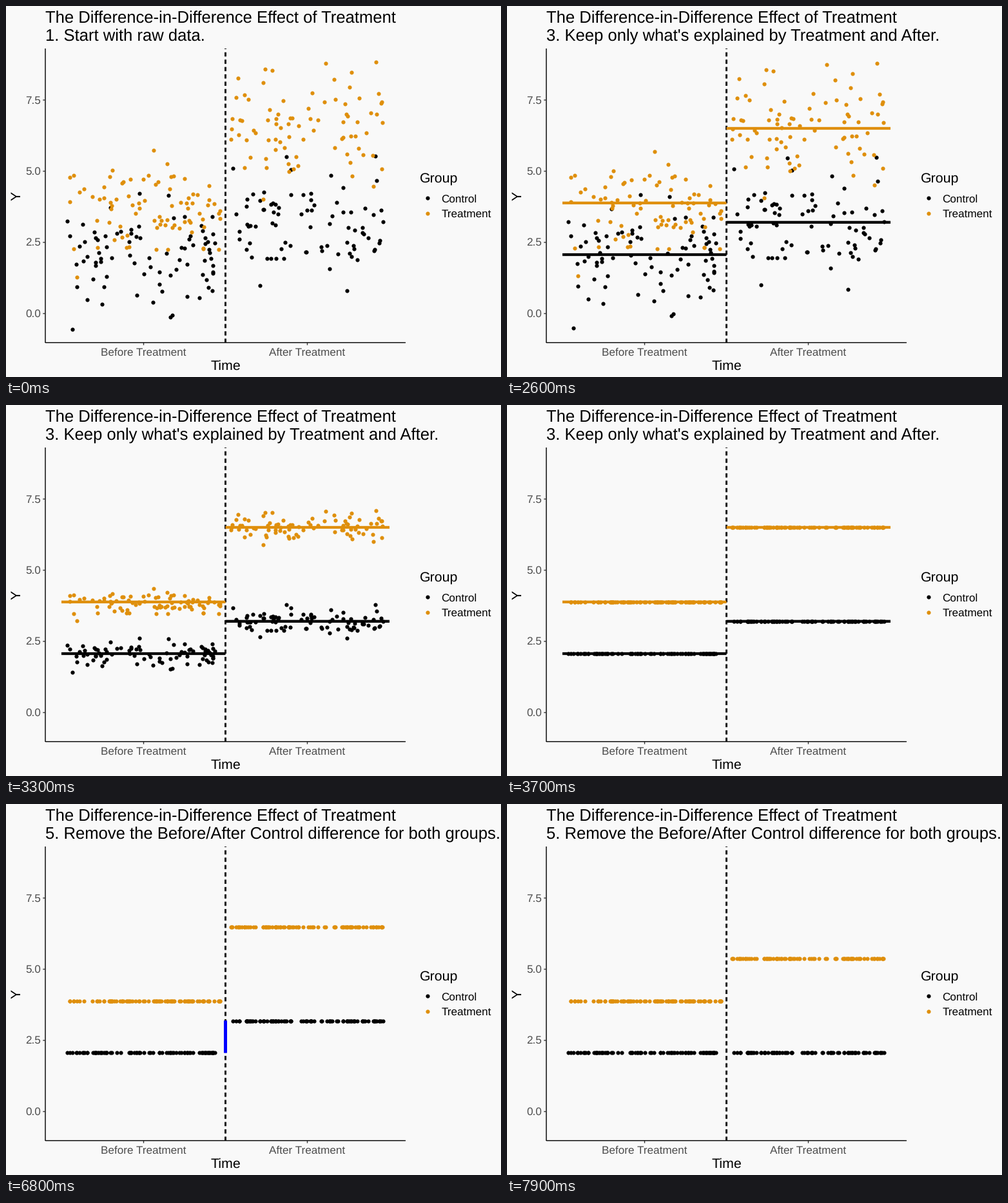
Write a matplotlib script that moves like this. It is 768 by 576 pixels and loops after 8000 ms.

```python
import numpy as np
import matplotlib.pyplot as plt
from matplotlib.animation import FuncAnimation

W, H, DPI = 768, 576, 96
PX = 72 / DPI  # points per pixel
STEP_MS, N_FRAMES = 100, 80
BLACK, ORANGE, BLUE, BG = "#000000", "#df8f0c", "#0000ff", "#f9f9f9"
LEFT, MID, RIGHT = 86, 340.5, 595  # edges of the two periods
TREND = 1.135  # change of Control over time

plt.rcParams.update({
    "font.family": "Liberation Sans",
    "text.hinting": "none",
    "lines.solid_capstyle": "butt",
})

# Step start, in frames, and its subtitle
STEPS = [
    (0, "1. Start with raw data."),
    (5, "2. Explain Y using Treatment and After."),
    (26, "3. Keep only what's explained by Treatment and After."),
    (47, "4. See how Control changed Before to After."),
    (68, "5. Remove the Before/After Control difference for both groups."),
]


def to_px(y):
    return 477.5 - 44.2 * y


def ease(t):
    return (1 - np.cos(np.pi * np.clip(t, 0, 1))) / 2


fig = plt.figure(figsize=(W / DPI, H / DPI), dpi=DPI, facecolor=BG)
ax = fig.add_axes([0, 0, 1, 1])
ax.set(xlim=(0, W), ylim=(H, 0))
ax.axis("off")


def label(x, y, s, size, color=BLACK, **kw):
    return ax.text(x, y, s, fontsize=size, color=color, va="baseline", **kw)


def line(x, y, width, color=BLACK, **kw):
    return ax.plot(x, y, lw=width * PX, color=color, snap=False, **kw)[0]


def dots(x, y, color):
    return ax.scatter(x, y, s=(6.2 * PX) ** 2, color=color, linewidths=0,
                      zorder=3)


class Cloud:
    """Jittered points of one group in one period, with their mean line."""

    def __init__(self, color, after, mean, low, high, rng, n=80):
        self.after, self.mean = after, mean
        start, end = (MID, RIGHT) if after else (LEFT, MID)
        x = rng.uniform(start + 8, end - 7, n)
        y = rng.normal(mean, 1, 3 * n)
        y = y[(y > low[1]) & (y < high[1])][:n]
        # the lowest and highest point are fixed
        self.x = np.r_[x, low[0], high[0]]
        self.y = np.r_[y, low[1], high[1]]
        self.dots = dots(self.x, to_px(self.y), color)
        self.line = line([start, end], [to_px(mean)] * 2, 4.27, color, zorder=4)

    def move(self, flat, drop):
        y = self.y + (self.mean - self.y) * flat - TREND * drop * self.after
        self.dots.set_offsets(np.column_stack([self.x, to_px(y)]))


# Axes
line([61, 61], [66, 523], 1.42)
line([61, 620], [522.6, 522.6], 1.42)
for tick in (0, 2.5, 5, 7.5):
    y = to_px(tick)
    line([57.3, 61], [y, y], 1.42, "#333333")
    label(54, y + 6.1, f"{tick:.1f}", 12.8, "#4d4d4d", ha="right")
for x, period in [(213.5, "Before"), (467.5, "After")]:
    line([x, x], [523, 526.5], 1.42, "#333333")
    label(x, 542.4, f"{period} Treatment", 12.8, "#4d4d4d", ha="center")
label(MID, 565.2, "Time", 16, ha="center")
label(22.3, 294.8, "Y", 16, rotation=90, rotation_mode="anchor", ha="center")

# Legend
label(641.7, 274.5, "Group", 16)
for y, name, color in [(298.4, "Control", BLACK), (321.5, "Treatment", ORANGE)]:
    dots(653.6, y, color)
    label(675.5, y + 6.4, name, 12.8)

# Titles
label(61, 26.4, "The Difference-in-Difference Effect of Treatment", 19.2)
subtitle = label(61, 55, "", 19.2)

# Data
line([MID, MID], [523, 66], 2.85, zorder=2, dashes=(2.3, 1.7),
     dash_capstyle="butt")
rng = np.random.default_rng(12)
clouds = [
    Cloud(BLACK, False, 2.07, (103, -0.55), (207, 4.22), rng),
    Cloud(BLACK, True, 3.205, (529, 0.8), (573, 5.53), rng),
    Cloud(ORANGE, False, 3.885, (110, 1.28), (229, 5.73), rng),
    Cloud(ORANGE, True, 6.505, (399, 4.02), (574, 8.84), rng),
]
base, top = clouds[0].mean, clouds[1].mean
gap = line([MID, MID], [0, 0], 5, BLUE, zorder=5)


def update(i):
    subtitle.set_text([s for start, s in STEPS if start <= i][-1])
    flat = ease((i - 25) / 12)
    drop = ease((i - 67) / 12)
    for cloud in clouds:
        cloud.move(flat, drop)
        cloud.line.set_visible(9 <= i < 47)
    gap.set_visible(i >= 51 and drop < 1)
    gap.set_ydata([to_px(base) + 0.5, to_px(top - TREND * drop) - 0.5])
    return []


anim = FuncAnimation(fig, update, frames=N_FRAMES, interval=STEP_MS,
                     repeat=True, repeat_delay=0, blit=False)
plt.show()
```
